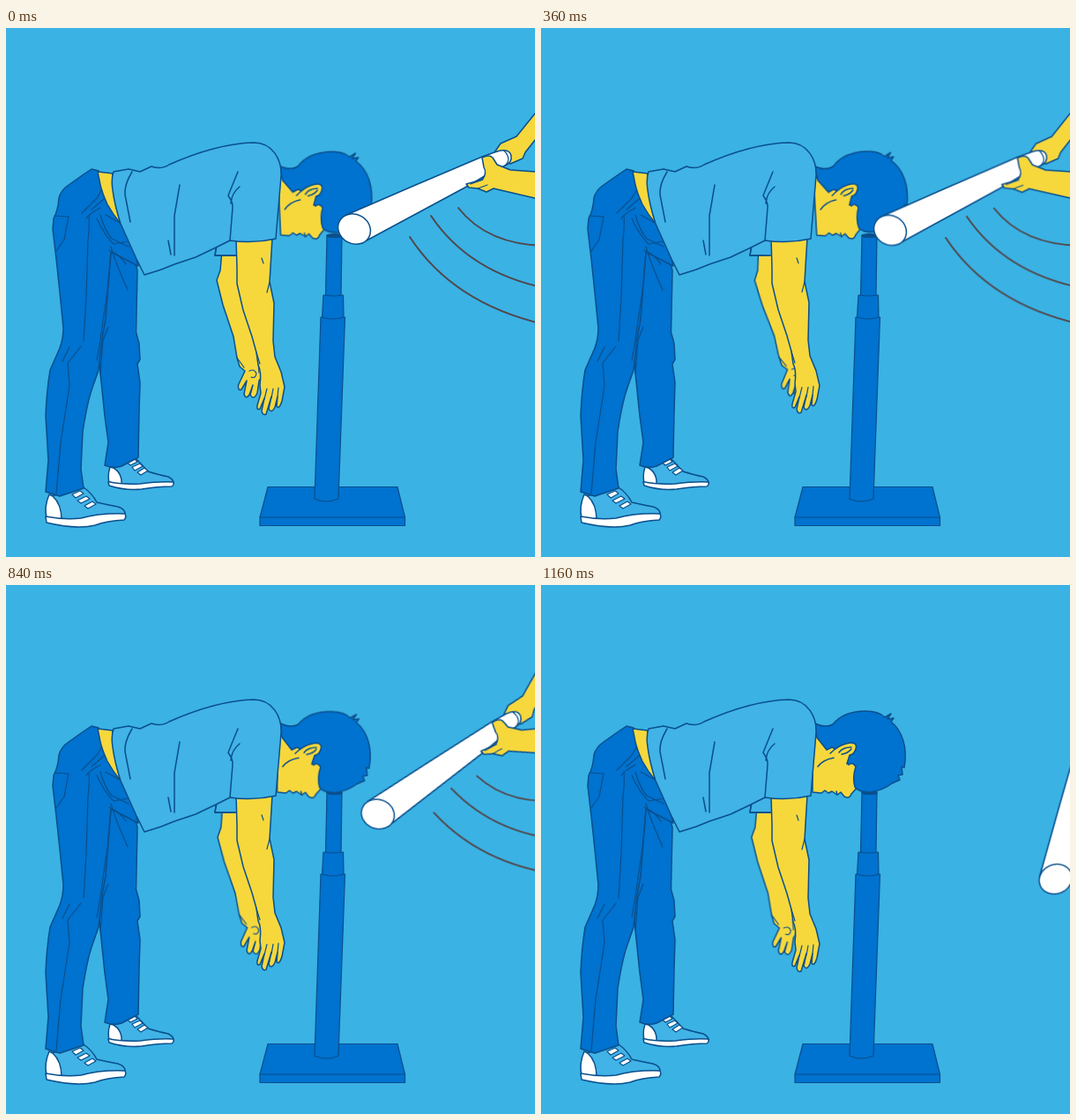
Write an HTML page that moves like this. It is 600 by 600 pixels and loops after 1200 ms.

```html
<!DOCTYPE html>
<html lang="en">
<head>
<meta charset="utf-8">
<title>Batting tee</title>
<style>
html, body { margin: 0; width: 100%; height: 100%; overflow: hidden; background: #3ab2e4; }
svg { display: block; width: 100vw; height: 100vh; }
path, ellipse { stroke: #0a4f8c; stroke-width: 1.5; stroke-linejoin: round; stroke-linecap: round; }
.blue { fill: #0072cf; }
.sky { fill: #41b3e6; }
.skin { fill: #f6d83d; }
.white { fill: #fff; }
.line { fill: none; }
.thin { stroke-width: 1.2; }
.plain { stroke: none; }
.whoosh { fill: none; stroke: #51474b; stroke-width: 2; }

#bat, #head, #farArm, #nearArm { animation: 1200ms -1ms infinite; }
#bat { animation-name: swing; transform-origin: 600px 83px; }
#head { animation-name: bump; transform-origin: 318px 190px; }
#farArm { animation-name: sway; transform-origin: 245px 220px; }
#nearArm { animation-name: bob; transform-origin: 280px 240px; }

/* Every segment advances in 40 ms steps. */
@keyframes swing {
  0% { transform: rotate(0deg); animation-timing-function: steps(3); }
  10% { transform: rotate(-54.4deg); animation-timing-function: steps(2); }
  16.666% { transform: rotate(-76deg); animation-timing-function: steps(3); }
  26.666% { transform: rotate(-51deg); animation-timing-function: steps(1); }
  30% { transform: rotate(-.4deg); animation-timing-function: steps(4); }
  43.333% { transform: rotate(-34.7deg); animation-timing-function: steps(3); }
  53.333% { transform: rotate(-70deg); animation-timing-function: steps(2); }
  60% { transform: rotate(-51deg); animation-timing-function: steps(1); }
  63.333% { transform: rotate(0deg); animation-timing-function: steps(2); }
  70% { transform: rotate(-9.5deg); animation-timing-function: steps(4); }
  83.333% { transform: rotate(-30.5deg); animation-timing-function: steps(3); }
  93.333% { transform: rotate(-60deg); animation-timing-function: steps(1); }
  96.666% { transform: rotate(-51deg); animation-timing-function: steps(1); }
  100% { transform: rotate(0deg); }
}
@keyframes bump {
  0% { transform: translate(1.5px, -.5px) rotate(-2.6deg); animation-timing-function: steps(2); }
  6.666% { transform: translate(0, 0) rotate(.6deg); animation-timing-function: steps(1); }
  10%, 26.666% { transform: translate(0, 0) rotate(0deg); animation-timing-function: steps(1); }
  30% { transform: translate(2.2px, -.3px) rotate(-3.3deg); animation-timing-function: steps(2); }
  36.666% { transform: translate(0, 0) rotate(.6deg); animation-timing-function: steps(1); }
  40%, 60% { transform: translate(0, 0) rotate(0deg); animation-timing-function: steps(1); }
  63.333% { transform: translate(1.5px, -.5px) rotate(-2.6deg); animation-timing-function: steps(2); }
  70% { transform: translate(0, 0) rotate(.6deg); animation-timing-function: steps(1); }
  73.333%, 96.666% { transform: translate(0, 0) rotate(0deg); animation-timing-function: steps(1); }
  100% { transform: translate(1.5px, -.5px) rotate(-2.6deg); }
}
@keyframes sway {
  0% { transform: rotate(0deg); animation-timing-function: steps(3); }
  10% { transform: rotate(-.9deg); animation-timing-function: steps(6); }
  30% { transform: rotate(-2.9deg); animation-timing-function: steps(4); }
  43.333% { transform: rotate(-2.5deg); animation-timing-function: steps(8); }
  70% { transform: rotate(-.9deg); animation-timing-function: steps(4); }
  83.333% { transform: rotate(.1deg); animation-timing-function: steps(4); }
  96.666% { transform: rotate(.2deg); animation-timing-function: steps(1); }
  100% { transform: rotate(0deg); }
}
@keyframes bob {
  0%, 10% { transform: scaleY(1); animation-timing-function: steps(6); }
  30%, 70% { transform: scaleY(.991); animation-timing-function: steps(8); }
  96.666%, 100% { transform: scaleY(1); animation-timing-function: steps(1); }
}
</style>
</head>
<body>
<svg viewBox="0 0 600 600">
  <g id="tee">
    <path class="blue thin" d="M297 520.500H444L452.500 555V564.500H288V555Z"/>
    <path class="line thin" d="M288 555H452.500"/>
    <path class="blue thin" d="M357 328L350 534Q363 540 377 534L384.500 328Z"/>
    <path class="blue thin" d="M360 303L358.500 328Q371 332 383 328L382.500 303Z"/>
    <path class="blue thin" d="M364 235L362.500 303Q372 305 380 303L381 235Z"/>
    <ellipse cx="372.500" cy="235.500" rx="8.500" ry="1.800" fill="#0a4f8c"/>
  </g>

  <g id="farShoe">
    <path class="sky" d="M122 498L136 494L147 488Q155 496 161 503Q174 507 184 509Q190 512 190 516L158 519L118 516Z"/>
    <path class="white" d="M118 498Q115 507 117 516L131 518Q132 505 122 499Z"/>
    <path class="white" d="M116 514.500Q131 518 152 517Q174 514 190 515Q191 518 188 520Q172 520 154 523Q136 525 117 519Z"/>
    <path class="white thin" d="M138 493L146 489L149 492L141 496ZM143 498L152 494L155 497L146 502ZM149 504L157 499L161 502L153 507Z"/>
  </g>
  <path class="blue" d="M95 200L104 360L107 392L112 440L116 470L112 496Q122 500 131 497L150 487L151 435L152 402L149 381L152 376L151 358L147.500 345L149 275L135 220Z"/>

  <g id="nearShoe">
    <path class="sky" d="M50 531L74 526L88 521Q98 528 103 538Q116 541 127 543Q136 546 135 552L100 558L48 557Z"/>
    <path class="white" d="M49 529Q43 543 46 556L63 558Q63 540 53 531Z"/>
    <path class="white" d="M45 554Q66 558 85 556Q106 550 135 551Q137 555 134 558Q114 559 101 564Q80 569 46 561Z"/>
    <path class="white thin" d="M75 529L84 525L88 528L79 533ZM81 536L91 531L95 534L85 539ZM89 542L98 537L102 540L93 545Z"/>
  </g>
  <path class="blue" d="M105 162L97 160L88 166L71 178Q62 184 60 193Q59 207 54 216L53 228L57 262L61 300L65 340Q65 352 61 363L50 388Q46 412 45 440L48 490L45 526L61 531L88 522L85 500L87 458Q92 425 98 408L105 388L109 352L113 330L119 254L150 270L140 230L113 180Z"/>
  <path class="line thin" d="M55 213L71 214L66 240L57 253M94 212Q95 225 93 240L91 305L88 355M85 361L70 380L72 406L62 470L57 528M72 362L64 378M109 183L103 193L86 210M112 193L97 206M107 204Q94 211 91 216M107 212Q112 230 120 239L139 248M103 216Q111 234 122 245L139 242M113 212L131 222M119 248Q124 266 138 297M117 252Q130 258 136 268M119 256L115 298L106 360L103 377M116 339L110 354L107 392"/>
  <path class="skin" d="M104 163L121 165Q120 188 130 222Q121 211 115 200Q109 187 107 178Z"/>

  <path class="sky" d="M240 238L237 258H262L263 238Z"/>
  <g id="farArm">
    <path class="skin" d="M244.500 258L243 275L239 286L246 314L258 350L262 374L265 384L271 389L263.500 405Q263 412 267 410L273 400L270 415Q272 422 276 416L280 405L277 416Q281 423 285 414L287 400Q292 395 289 380L283 350L263 258Z"/>
    <path class="line thin" d="M262 374L270 385M276 389Q282 386 284 392Q283 398 278 396M286 379L287 391"/>
  </g>
  <path class="sky plain" d="M240 240L238 257H262V240Z"/>
  <path class="line" d="M239 247L237 258H260"/>
  <g id="nearArm">
    <path class="skin" d="M261 238L262 273L262 290L269 320L279 350L284 368L286 382Q290 390 288 405L289 414L285 428Q284 434 288 432L293 420L290 434Q291 440 295 438L301 418L298 432Q301 438 305 430L308 418L307 429Q310 433 313 423L316 407L312 390L305 373L303 355L304 312L299 288L302 238Z"/>
    <path class="line thin" d="M290 261L292 267M296 409L293 421M303 409L301 420M309 408L308 418M284 368L288 381M299 288L296 300"/>
  </g>

  <g id="head">
    <path class="skin" d="M308 170V235L318 236L322 233L326 236L330 234L336 238L340 235L344 240Q350 243 352 237L360 228L364 180L325 170Z"/>
    <path class="blue" d="M309 156Q322 163 331 158C340 147 354 143 368 143Q383 143 390 150L397 146L393 152L400 151L397 155Q407 163 411 177Q415 191 412 207L409 206L410 215L405 216L407 221L398 225Q388 233 373 235Q360 235 356 229Q353 218 357 206Q353 200 349 204L346 200L352 190Q357 180 348 180Q340 181 334 186L330 184L324 187L313 173Z"/>
    <path class="skin plain" d="M328 192Q337 182 346 180Q358 177 357.500 184Q356 192 350 193L346 203L336 203Z"/>
    <path class="line" d="M328 191Q337 182 346 180Q358 177 357.500 184Q356 192 350 193L347 203M338 190Q342 184 352 184M341 192Q348 191 352 186M314 206Q320 198 332 196M336 238L335 234"/>
  </g>

  <path class="sky" d="M122 163L139 160L152 163L165 157Q176 161 185 155Q239 131 281 130C302 130 313 149 312 168L306 239Q280 245 254 241L238 249L215 260L191 268L176 274L157 280L148 262L130 222Q123 200 121 184Q119 171 122 163Z"/>
  <path class="line" d="M143 163Q134 178 135 189L141 220M197 178L191 213V258M184 241L187 257M263 163L252 190Q258 199 257 204L254 241M265 180Q256 187 255 199"/>

  <g id="bat">
    <path class="whoosh" d="M458 237Q507 312 610 336M482 213Q525 277 612 295M513 204Q546 246 612 247"/>
    <path class="skin" d="M552 144L561 131L579 123L600 97L640 75V105L600 127L589 141L586 148L572 154Z"/>
    <path class="white" d="M386 212L460 180L540 146L557 140Q571 136 573 145Q574 153 566 156L546 166L526 178L409 241Z"/>
    <path class="line thin" d="M565 139Q574 149 566 156"/>
    <ellipse class="white" cx="395" cy="228" rx="19" ry="16.500" transform="rotate(30 395 228)"/>
    <path class="skin" d="M540 147Q548 143 552 147L557 155L572 161L600 163L700 176V218L600 193L570 186L553 182L545 186L535 182L525 181L522 177L540 172Q546 165 542 158Z"/>
    <path class="line thin" d="M527 177L541 172M535 182L546 178"/>
  </g>
</svg>
</body>
</html>
```
